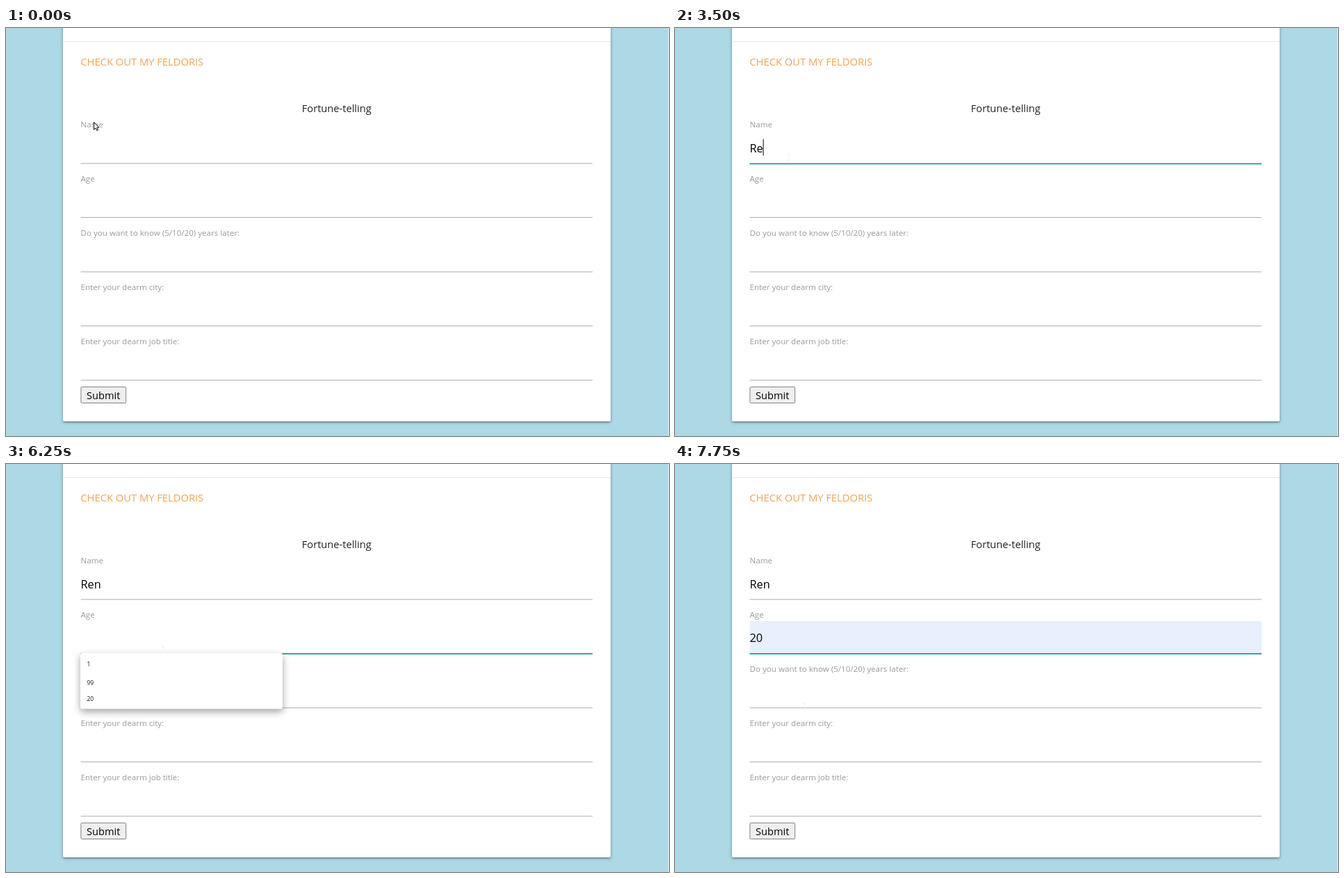
Write an HTML page that moves like this. It is 954 px wide and 587 px high and loops after 8000 ms.

```html
<!DOCTYPE html>
<html lang="en">
<head>
<meta charset="utf-8">
<title>Fortune-telling form</title>
<style>
  html, body { margin: 0; width: 100%; height: 100%; overflow: hidden; background: #add8e6; }
  .card {
    position: absolute; left: 81.6px; top: -10px; width: 788.4px; height: 576px;
    background: #fff; border-radius: 2px;
    box-shadow: 0 2px 2px rgba(0, 0, 0, .14), 0 3px 1px -2px rgba(0, 0, 0, .12), 0 1px 5px rgba(0, 0, 0, .3);
  }
  svg {
    position: absolute; left: 0; top: 0; width: 954px; height: 587px;
    font-family: "Open Sans", "Noto Sans", sans-serif;
  }
  .menu { filter: drop-shadow(0 0 .6px rgba(0, 0, 0, .25)) drop-shadow(0 4px 5.5px rgba(0, 0, 0, .36)); }
  .label { font-size: 11.6px; fill: #9a9a9a; }
  .item { font-size: 8.35px; fill: #111; }
</style>
</head>
<body>
<div class="card"></div>
<svg viewBox="0 0 954 587" xmlns="http://www.w3.org/2000/svg">
  <rect x="953" width="1" height="587" fill="#e6f2f6"/>
  <rect x="81.6" y="19" width="788.4" height="1" fill="#e6e6e6"/>
  <text x="107.3" y="54.2" font-size="14.72" fill="#f0a457">CHECK OUT MY FELDORIS</text>
  <text x="475.8" y="120.5" font-size="14.65" fill="#212121" text-anchor="middle">Fortune-telling</text>
  <rect id="fill" x="107.5" y="226" width="736.5" height="46.5" fill="#e8f0fe"/>
  <g id="fields"></g>
  <rect x="107.9" y="516.4" width="64.7" height="23.1" rx="1.5" fill="#efefef" stroke="#7c7c7c" stroke-width=".95"/>
  <text x="140.2" y="534" font-size="14.55" text-anchor="middle">Submit</text>
  <text id="name" x="107.5" y="178.5" font-size="16.3"></text>
  <text id="age" x="107.5" y="256"></text>
  <rect id="caret" width="1" height="23.5" fill="#000"/>
  <g id="nameMenu"></g>
  <g id="ageMenu"></g>
  <g id="trash" fill="none" stroke="#777" stroke-width="1">
    <path d="M-5 -4H5M-1.8 -4V-5.5H1.8V-4M-3.8 -4L-3 5.5H3L3.8 -4M-1.2 -1.5V3M1.2 -1.5V3"/>
  </g>
  <path id="beam" d="M-2 -4.5H2M0 -4.5V4.5M-2 4.5H2" fill="none" stroke-width="1"/>
  <path id="arrow" d="M.5 .5V11.3L3 9L4.8 12.6L6.5 11.8L4.8 8.2H7.8Z" fill="#fff" stroke="#000" stroke-width="1"/>
</svg>
<script>
const LOOP = 8000;
const GREY = "#a8a8a8", TEAL = "#26a69a";
const LINE = 0.955;
const $ = id => document.getElementById(id);

function add(parent, tag, attrs, text = "") {
  const el = document.createElementNS("http://www.w3.org/2000/svg", tag);
  set(el, attrs);
  el.textContent = text;
  return parent.appendChild(el);
}
function set(el, attrs) {
  for (const key in attrs) el.setAttribute(key, attrs[key]);
}
function show(el, on) {
  el.style.display = on ? "" : "none";
}

const fields = [
  ["Name", 194.4],
  ["Age", 272.1],
  ["Do you want to know (5/10/20) years later:", 350.4],
  ["Enter your dearm city:", 428.2],
  ["Enter your dearm job title:", 506.3]
];
const lines = fields.map(([label, y], i) => {
  add($("fields"), "text", { class: "label", x: 107.5, y: 143 + 78 * i }, label);
  return add($("fields"), "rect", { x: 107.5, y, width: 736.5 });
});

function menuBox(menu, y, height) {
  add(menu, "rect", { class: "menu", x: 107, y, width: 291, height, rx: 2.5, fill: "#fff" });
}
function menuItem(menu, y, text) {
  add(menu, "text", { class: "item", x: 116.5, y }, text);
}

menuBox($("nameMenu"), 194, 155);
["Leifan Teng", "L", "Leifan", "ff", "e", "f"].forEach((text, i) =>
  menuItem($("nameMenu"), 213.2 + 24.75 * i, text));

menuBox($("ageMenu"), 272, 80.5);
const hover = add($("ageMenu"), "rect",
  { x: 110.5, width: 259.5, height: 24, fill: "#e1edfa", stroke: "#86aed0" });
menuItem($("ageMenu"), 291, "1");
menuItem($("ageMenu"), 317.7, "99");
menuItem($("ageMenu"), 340.8, "20");

// Value of the last step that has started; each step is [start, value].
function at(t, steps) {
  let value = null;
  for (const [start, v] of steps) if (t >= start) value = v;
  return value;
}

const arrowSteps = [[0, [126, 135]], [250, null], [4250, [219.5, 214]], [4500, null],
  [6500, [203, 309]], [6750, [203, 341.7]], [7000, [201.5, 340]], [7500, [205, 418]], [7750, null]];
const beamSteps = [[250, [171.5, 168.5, "#c8c8c8"]], [500, null], [1500, [164, 186, "#f0f0f0"]],
  [4250, null], [4500, [225, 262, "#f0f0f0"]], [4750, [226, 267, "#f0f0f0"]],
  [6500, null], [7750, [187, 349, "#f0f0f0"]]];
const nameStart = [107.6, 160], ageStart = [107.6, 237.5];
const caretSteps = [[1500, nameStart], [2000, null], [2500, nameStart], [3000, null],
  [3250, [117.6, 160]], [3500, [126.6, 160]], [3750, [136.6, 160]], [4250, null],
  [4750, ageStart], [5250, null], [5750, ageStart], [6250, null],
  [6750, ageStart], [7250, [126.4, 237.5]], [7750, null]];
const nameSteps = [[0, ""], [3250, "R"], [3500, "Re"], [3750, "Ren"]];
const ageSteps = [[0, ""], [6500, "99"], [6750, "20"]];
const hoverSteps = [[6500, 300.5], [6750, 325]];
const focusSteps = [[1500, 0], [4750, 1]];

function place(el, pos) {
  show(el, pos);
  if (pos) el.setAttribute("transform", `translate(${pos[0]} ${pos[1]})`);
}

function draw(t) {
  const focus = at(t, focusSteps);
  const settling = (t >= 1500 && t < 1750) || (t >= 4750 && t < 5000);
  lines.forEach((line, i) => {
    const on = i === focus;
    set(line, { height: on ? 2 * LINE : LINE, fill: on ? (settling ? "#38ab9e" : TEAL) : GREY });
  });

  $("name").textContent = at(t, nameSteps);
  $("age").textContent = at(t, ageSteps);
  $("age").setAttribute("font-size", t < 7250 ? 14.5 : 16.3);
  show($("fill"), t >= 6500);

  show($("nameMenu"), t >= 1500 && t < 3250);
  show($("ageMenu"), t >= 4750 && t < 7250);
  const row = at(t, hoverSteps);
  show(hover, row);
  if (row) hover.setAttribute("y", row);
  place($("trash"), row && t < 7250 ? [383, row + 12.2] : null);

  place($("caret"), at(t, caretSteps));
  place($("arrow"), at(t, arrowSteps));
  const beam = at(t, beamSteps);
  place($("beam"), beam);
  if (beam) $("beam").setAttribute("stroke", beam[2]);
}

function tick() {
  draw(performance.now() % LOOP);
  requestAnimationFrame(tick);
}
tick();
</script>
</body>
</html>
```
